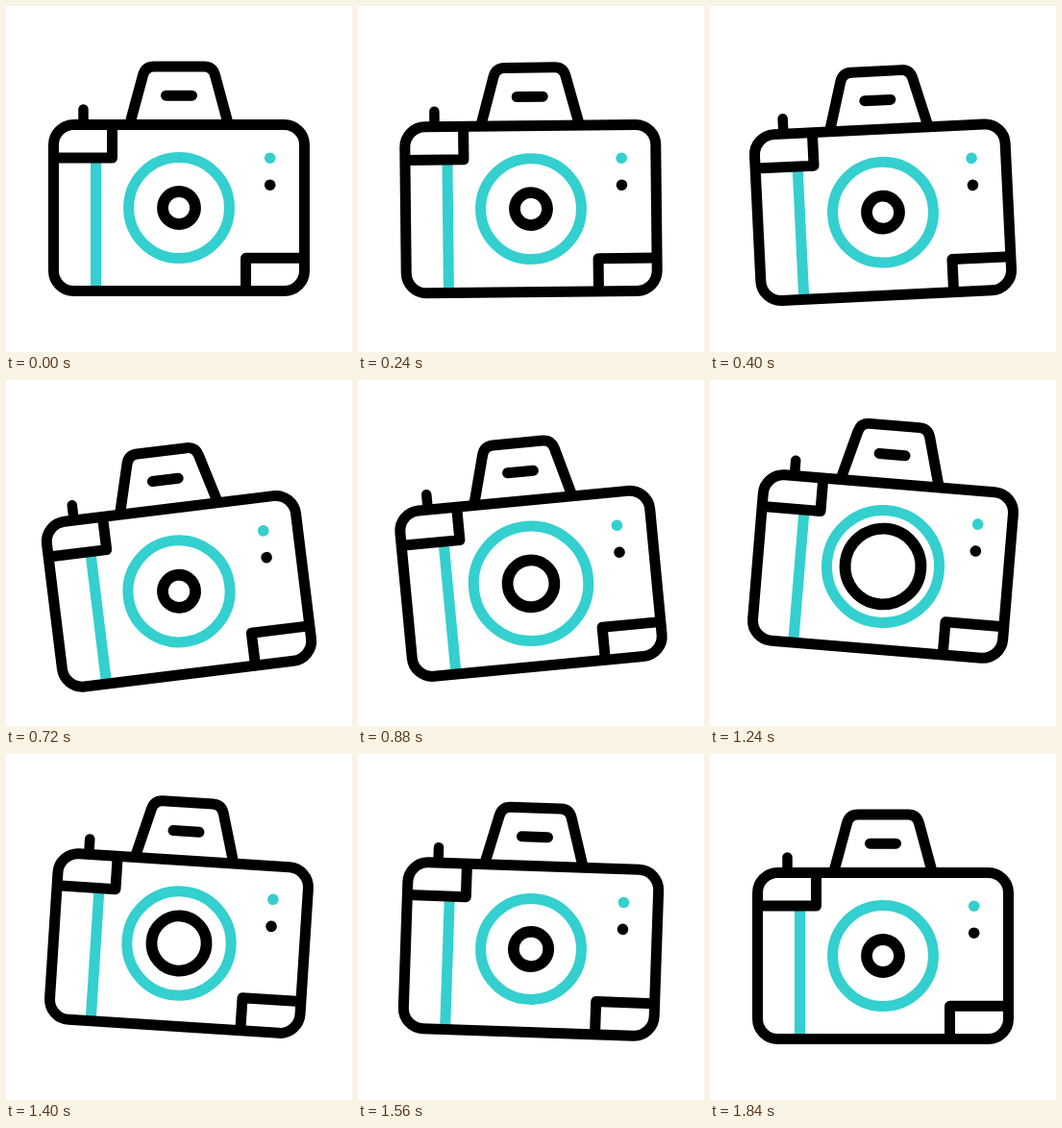
An HTML page with a canvas for the animation above (1920 ms loop, 360 px wide and 360 px high).

```html
<!DOCTYPE html>
<html lang="en">
<head>
<meta charset="utf-8">
<title>Camera</title>
<style>
  html, body { margin: 0; width: 100%; height: 100%; overflow: hidden; background: #fff; }
  canvas { display: block; width: 100vmin; height: 100vmin; }
</style>
</head>
<body>
<canvas id="stage"></canvas>
<script>
const SIZE = 360, LOOP = 1920, STEP = 40;
const BLACK = '#000', TEAL = '#34cfcf';
const canvas = document.getElementById('stage');
const ctx = canvas.getContext('2d');

// Keys are [time, value]; every span eases in and out.
const ANGLE = [[120, 0], [778, -7.15], [1203, 4.75], [1840, 0]];
const SHIFT = [[120, 0], [695, 9.8], [745, 9.8], [1110, -16], [1230, -16], [1840, 0]];
const RING = [[670, 0], [1000, 10.5], [1540, 0]];
const IRIS = [[710, 0], [1170, 24], [1620, 0]];

function valueAt(keys, t) {
  if (t <= keys[0][0]) return keys[0][1];
  for (let i = 1; i < keys.length; i++) {
    const [t0, a] = keys[i - 1], [t1, b] = keys[i];
    if (t < t1) {
      const u = (t - t0) / (t1 - t0);
      return a + (b - a) * u * u * (3 - 2 * u);
    }
  }
  return keys[keys.length - 1][1];
}

function stroke(path, color = BLACK, width = 11, cap = 'round') {
  ctx.strokeStyle = color;
  ctx.lineWidth = width;
  ctx.lineCap = cap;
  ctx.lineJoin = 'round';
  ctx.stroke(new Path2D(path));
}

function circle(x, y, r) {
  ctx.beginPath();
  ctx.arc(x, y, r, 0, Math.PI * 2);
}

function dot(x, y, color) {
  circle(x, y, 5.8);
  ctx.fillStyle = color;
  ctx.fill();
}

function ring(r, color, width) {
  circle(180, 210, r);
  ctx.strokeStyle = color;
  ctx.lineWidth = width;
  ctx.stroke();
}

function drawBody() {
  stroke('M93.5 162V293', TEAL, 11, 'butt');
  stroke('M80.5 107.5V122', BLACK, 10.5);
  stroke('M129 122L142.5 72Q145 63 154 63H206Q215 63 217.5 72L231 122', BLACK, 11, 'butt');
  stroke('M166.5 93.2H193.5');
  stroke('M50 158H110.5V124');
  stroke('M249.5 296V262.3H310');
  ctx.lineWidth = 11;
  ctx.beginPath();
  ctx.roundRect(49.5, 123.5, 261, 173, 21);
  ctx.stroke();
  dot(274.7, 158.2, TEAL);
  dot(274.7, 186.2, BLACK);
}

function draw(t) {
  const scale = canvas.width / SIZE;
  ctx.setTransform(scale, 0, 0, scale, 0, 0);
  ctx.fillStyle = '#fff';
  ctx.fillRect(0, 0, SIZE, SIZE);
  ctx.translate(180, 210 + valueAt(SHIFT, t));
  ctx.rotate(valueAt(ANGLE, t) * Math.PI / 180);
  ctx.translate(-180, -210);
  drawBody();
  ring(52.4 + valueAt(RING, t), TEAL, 11);
  ring(17 + valueAt(IRIS, t), BLACK, 11.8);
}

function resize() {
  const side = Math.min(innerWidth, innerHeight) || SIZE;
  canvas.width = canvas.height = Math.round(side * (devicePixelRatio || 1));
}

const start = performance.now();
function tick() {
  const t = (performance.now() - start) % LOOP;
  draw(Math.floor(t / STEP) * STEP);
  requestAnimationFrame(tick);
}

addEventListener('resize', resize);
resize();
tick();
</script>
</body>
</html>
```
